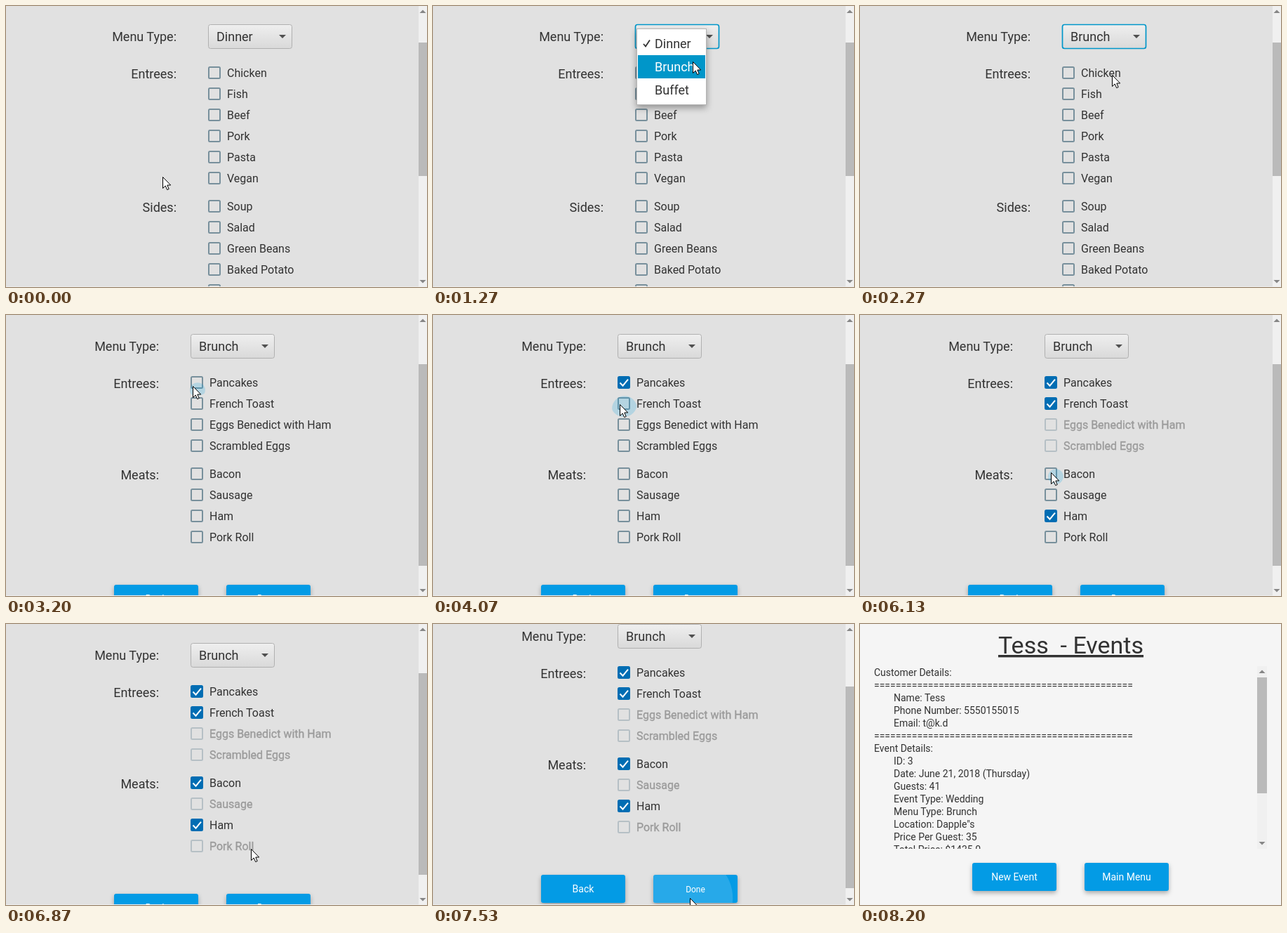
Recreate the animation shown at these times as an HTML page. Size 600x400 px, loop 8670 ms.

```html
<!DOCTYPE html>
<html lang="en">
<head>
<meta charset="utf-8">
<title>Event menu form</title>
<style>
  html, body { margin: 0; width: 100%; height: 100%; overflow: hidden; background: #e1e1e1; }
  svg { display: block; width: 600px; height: 400px; }
  text { font-family: Roboto, Arial, sans-serif; fill: #323232; }
  .button { fill: #039be5; filter: drop-shadow(0 3px 3px rgba(0, 0, 0, .3)); }
  .popup { fill: #fff; stroke: #b4b4b4; filter: drop-shadow(0 4px 5px rgba(0, 0, 0, .35)); }
  .off { opacity: .4; }
  .off text { stroke: #323232; stroke-width: .35px; }
</style>
</head>
<body>
<svg id="stage" viewBox="0 0 600 400" xmlns="http://www.w3.org/2000/svg">
  <defs>
    <linearGradient id="face" x1="0" y1="0" x2="0" y2="1">
      <stop offset="0" stop-color="#efefef"/>
      <stop offset="1" stop-color="#d9d9d9"/>
    </linearGradient>
    <clipPath id="details"><rect x="0" y="60" width="566" height="260"/></clipPath>
    <clipPath id="boxClip"><circle id="boxHole" r="19"/></clipPath>
    <clipPath id="doneClip"><rect x="314" y="384" width="120" height="40" rx="3"/></clipPath>
  </defs>
</svg>
<script>
const LOOP = 8670;
const FPS = 15;
const stage = document.getElementById('stage');
const boxHole = document.getElementById('boxHole');

function add(parent, tag, attrs = {}, content) {
  const node = document.createElementNS('http://www.w3.org/2000/svg', tag);
  for (const key in attrs) node.setAttribute(key, attrs[key]);
  if (content) node.textContent = content;
  parent.appendChild(node);
  return node;
}

function set(node, attrs) {
  for (const key in attrs) node.setAttribute(key, attrs[key]);
}

const show = (node, on) => node.setAttribute('visibility', on ? 'visible' : 'hidden');

function label(parent, x, y, size, content, extra = {}) {
  return add(parent, 'text', { x, y, 'font-size': size, ...extra }, content);
}

function button(parent, x, y, caption) {
  add(parent, 'rect', { class: 'button', x, y, width: 120, height: 40, rx: 3 });
  return label(parent, x + 60, y + 25, 14, caption, { 'text-anchor': 'middle', style: 'fill:#fff' });
}

function scrollbar(parent, x, width, top, bottom, thumbTop, thumbHeight) {
  const mid = x + width / 2;
  const arrow = (y, dir) => add(parent, 'path', {
    d: `M${mid - 4.5} ${y + 2 * dir}h9l-4.5 ${-4.5 * dir}z`, fill: '#868686'
  });
  add(parent, 'rect', { x, y: top, width, height: bottom - top, fill: '#f0f0f0' });
  const thumb = add(parent, 'rect', { x, y: thumbTop, width, height: thumbHeight, fill: '#bababa' });
  arrow(top + 8, 1);
  arrow(bottom - 8, -1);
  return thumb;
}

function dropdown(parent, x, y, value) {
  const frame = add(parent, 'rect', {
    x: x + .5, y: y + .5, width: 119, height: 34, rx: 3, fill: 'url(#face)'
  });
  const text = label(parent, x + 12, y + 24, 18, value);
  add(parent, 'path', { d: `M${x + 101} ${y + 15}h10l-5 5z`, fill: '#505050' });
  return {
    text,
    focus: on => set(frame, { stroke: on ? '#0096c9' : '#b0b0b0', 'stroke-width': on ? 1.7 : 1 })
  };
}

function checkbox(parent, x, y, caption) {
  const group = add(parent, 'g');
  const box = add(group, 'rect', { x: x + 1, y: y - 8, width: 16, height: 16, rx: 1.5, 'stroke-width': 2 });
  const tick = add(group, 'path', {
    d: `M${x + 3.5} ${y + .5}l4 4.2 7.5-9`, fill: 'none', stroke: '#fff', 'stroke-width': 2
  });
  label(group, x + 27, y + 6, 16, caption);
  return (checked, disabled) => {
    set(box, { fill: checked ? '#006db3' : 'none', stroke: checked ? '#006db3' : '#78909c' });
    show(tick, checked);
    set(group, { class: disabled ? 'off' : '' });
  };
}

function section(parent, x, y, title, captions) {
  label(parent, x - 45, y + 8, 18, title, { 'text-anchor': 'end' });
  return captions.map((caption, i) => checkbox(parent, x, y + 30 * i, caption));
}

function form(x, y, menu, sections) {
  const group = add(stage, 'g');
  label(group, x - 45, y + 24, 18, 'Menu Type:', { 'text-anchor': 'end' });
  const choice = dropdown(group, x, y, menu);
  const boxes = {};
  let row = y + 69;
  for (const [title, captions] of sections) {
    section(group, x, row, title, captions).forEach((update, i) => {
      boxes[captions[i]] = update;
      update(false, false);
    });
    row += 30 * captions.length + 10;
  }
  return { group, choice, boxes };
}

// Form pages
add(stage, 'rect', { width: 600, height: 400, fill: '#e1e1e1' });
const dinner = form(288, 26, 'Dinner', [
  ['Entrees:', ['Chicken', 'Fish', 'Beef', 'Pork', 'Pasta', 'Vegan']],
  ['Sides:', ['Soup', 'Salad', 'Green Beans', 'Baked Potato', 'Fries']]
]);
const brunch = form(263, 27, 'Brunch', [
  ['Entrees:', ['Pancakes', 'French Toast', 'Eggs Benedict with Ham', 'Scrambled Eggs']],
  ['Meats:', ['Bacon', 'Sausage', 'Ham', 'Pork Roll']]
]);
button(brunch.group, 154, 384, 'Back');
const done = button(brunch.group, 314, 384, 'Done');
const press = add(add(brunch.group, 'g', { 'clip-path': 'url(#doneClip)' }), 'circle', {
  cx: 366, cy: 417, fill: '#fff', opacity: .14
});
brunch.group.appendChild(done);
const ripple = add(add(brunch.group, 'g', { 'clip-path': 'url(#boxClip)' }), 'circle', { fill: '#03a0e0' });
add(stage, 'rect', { y: 399, width: 600, height: 1, fill: '#ececec' });
const thumb = scrollbar(stage, 588, 12, 0, 400, 52, 190);

// Popup list
const popup = add(stage, 'g');
add(popup, 'rect', { class: 'popup', x: 290.5, y: 32.5, width: 99, height: 108 });
const highlight = add(popup, 'rect', { x: 292, width: 96, height: 33, fill: '#0096c9' });
const options = ['Dinner', 'Brunch', 'Buffet'].map((name, i) => label(popup, 316, 60 + 33 * i, 18, name));
const mark = add(popup, 'path', { d: 'M300 54l3 3.5 6-9', fill: 'none', 'stroke-width': 1.8 });

// Summary page
const summary = add(stage, 'g');
add(summary, 'rect', { width: 600, height: 400, fill: '#f5f5f5' });
label(summary, 300.5, 42, 34, 'Tess\u00a0 - Events', { 'text-anchor': 'middle', 'text-decoration': 'underline' });
const rule = '='.repeat(48);
const lines = add(summary, 'g', { 'clip-path': 'url(#details)' });
[
  'Customer Details:', rule,
  '\tName: Tess', '\tPhone Number: 5550155015', '\tEmail: t@k.d', rule,
  'Event Details:',
  '\tID: 3', '\tDate: June 21, 2018 (Thursday)', '\tGuests: 41', '\tEvent Type: Wedding',
  '\tMenu Type: Brunch', '\tLocation: Dapple"s', '\tPrice Per Guest: 35', '\tTotal Price: $1435.0'
].forEach((line, i) => label(lines, line[0] === '\t' ? 48 : 20, 74 + 18 * i, 14, line.trim()));
scrollbar(summary, 566, 14, 60, 320, 76, 165);
button(summary, 160, 340, 'New Event');
button(summary, 320, 340, 'Main Menu');

const cursor = add(stage, 'path', {
  d: 'M.5 .5V16.5L4.2 13 6.7 18.6 9.2 17.5 6.8 12H11.7Z', fill: '#fff', stroke: '#000', 'stroke-width': 1
});

// Pointer path: step, x, y
const path = [
  [0, 223, 243], [12, 395, 43], [15, 395, 43], [19, 370, 79], [24, 360, 114], [29, 360, 114],
  [31, 359, 98], [38, 359, 98], [45, 266, 101], [50, 266, 101], [55, 266, 127], [64, 266, 127],
  [72, 262, 281], [76, 267, 294], [80, 267, 294], [86, 272, 227], [88, 272, 227], [91, 272, 224],
  [95, 272, 224], [101, 345, 303], [108, 366, 390], [116, 366, 390], [123, 374, 404]
];

// Clicks on boxes: step, row centre
const clicks = [[48, 96], [60, 126], [77, 286], [92, 226]];

const smooth = u => u * u * (3 - 2 * u);

function pointer(n) {
  const i = path.findIndex(key => key[0] >= n);
  if (i < 0) return path[path.length - 1].slice(1);
  if (i === 0) return path[0].slice(1);
  const [a, x0, y0] = path[i - 1];
  const [b, x1, y1] = path[i];
  const raw = (n - a) / (b - a);
  const u = b - a > 4 ? smooth(raw) : raw;
  return [Math.round(x0 + (x1 - x0) * u), Math.round(y0 + (y1 - y0) * u)];
}

function drawRipple(n) {
  const click = clicks.find(([at]) => n >= at && n < at + 7);
  show(ripple, !!click);
  if (!click) return;
  const [at, row] = click;
  const age = n - at;
  const [x, y] = pointer(at);
  set(boxHole, { cx: 272, cy: row });
  set(ripple, {
    cx: x + 7, cy: y + 6,
    r: 30 * (1 - Math.exp(-.45 * (age + 1))),
    opacity: .2 * Math.min(1, (7 - age) / 3)
  });
}

function draw(n) {
  const onBrunch = n >= 35;
  const scrolled = n >= 106;
  show(dinner.group, !onBrunch);
  brunch.group.style.display = onBrunch ? '' : 'none';
  summary.style.display = n >= 116 ? '' : 'none';
  dinner.choice.text.textContent = n >= 34 ? 'Brunch' : 'Dinner';
  dinner.choice.focus(n >= 13);
  brunch.choice.focus(n < 48);

  const open = n >= 14 && n < 34;
  popup.style.display = open ? '' : 'none';
  const y = pointer(n)[1];
  const active = n < 16 || y < 70 ? 0 : y < 103 ? 1 : 2;
  set(highlight, { y: 37 + 33 * active });
  options.forEach((option, i) => { option.style.fill = i === active ? '#fff' : '#323232'; });
  set(mark, { stroke: active === 0 ? '#fff' : '#323232' });

  const toast = n >= 62;
  const bacon = n >= 94;
  brunch.boxes['Pancakes'](n >= 50, false);
  brunch.boxes['French Toast'](toast, false);
  brunch.boxes['Eggs Benedict with Ham'](false, toast);
  brunch.boxes['Scrambled Eggs'](false, toast);
  brunch.boxes['Ham'](n >= 79, false);
  brunch.boxes['Bacon'](bacon, false);
  brunch.boxes['Sausage'](false, bacon);
  brunch.boxes['Pork Roll'](false, bacon);
  drawRipple(n);

  set(brunch.group, { transform: `translate(0 ${scrolled ? -27 : 0})` });
  set(thumb, onBrunch ? { y: scrolled ? 89 : 70, height: 287 } : { y: 52, height: 190 });
  const held = n >= 110;
  show(press, held);
  set(press, { r: held ? 15.3 * Math.min(4, n - 109) : 0 });
  set(done, { 'font-size': held ? 12 : 14 });

  set(cursor, { transform: `translate(${pointer(n).join(' ')})` });
}

const start = performance.now();
function tick() {
  const t = (performance.now() - start) % LOOP;
  draw(Math.floor((t + 4) * FPS / 1000));
  requestAnimationFrame(tick);
}
tick();
</script>
</body>
</html>
```
